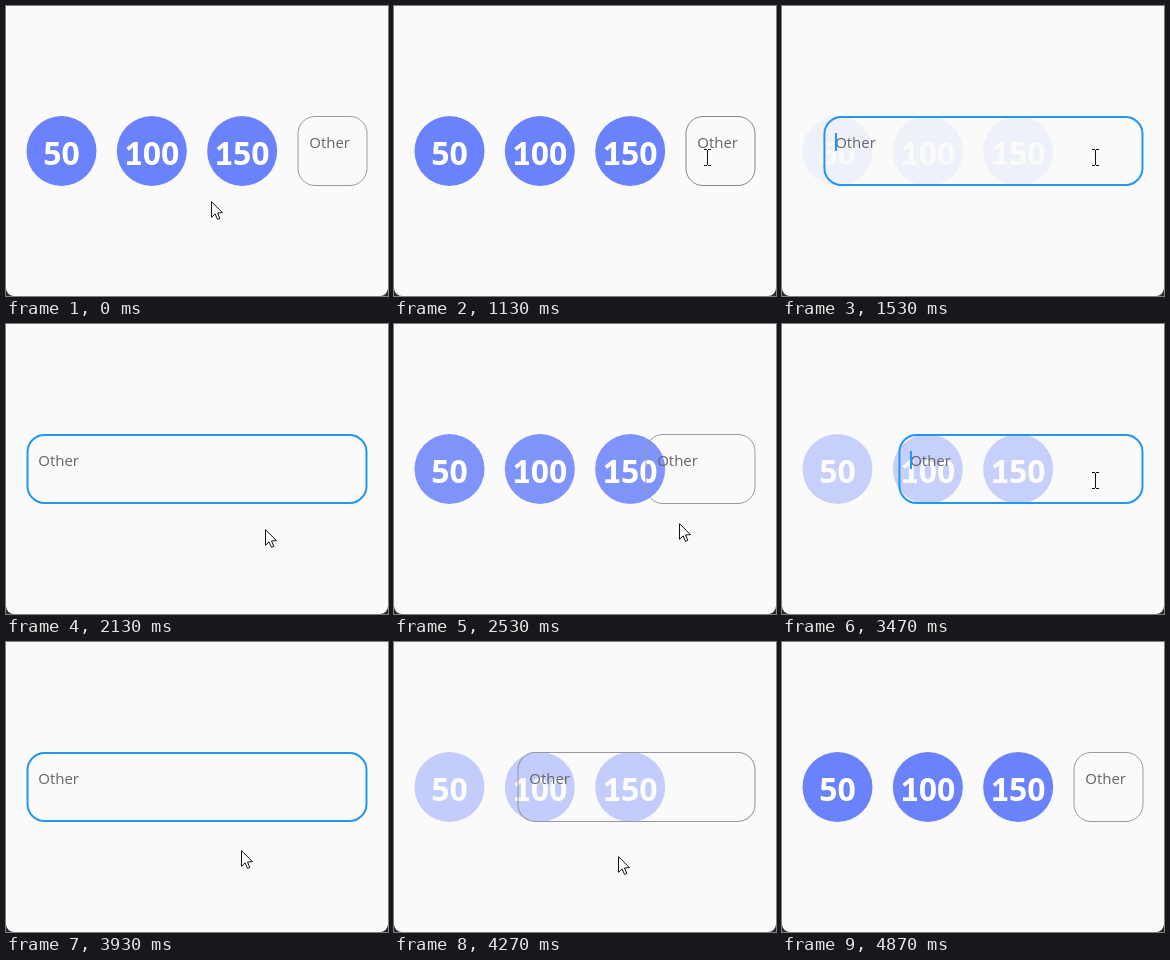
Recreate the animation shown at these times as an HTML page with a canvas. Size 382 by 290 pixels, loop 4990 ms.

```html
<!DOCTYPE html>
<html lang="en">
<head>
<meta charset="utf-8">
<title>Amount picker</title>
<style>
  html, body { margin: 0; width: 100%; height: 100%; overflow: hidden; background: #fafafa; }
  canvas { display: block; }
</style>
</head>
<body>
<canvas id="stage" width="382" height="290"></canvas>
<script>
const ctx = document.getElementById('stage').getContext('2d');
const LOOP = 4990, STEP = 200 / 3;
const MORPH = 420, BORDER = 150, CARET = 480;
const TOP = 110, SIZE = 70, RIGHT = 361.5, OPEN_LEFT = 20.5, CLOSED_LEFT = 291.5;
const PAPER = [250, 250, 250], BLUE = [106, 130, 251], FOCUS = [33, 150, 243];
const visits = [{ open: 1255, close: 2300 }, { open: 3309, close: 4167 }];

// Pointer keys: time, x, y
const path = [
  [435, 205, 195], [930, 309, 157], [1130, 313, 151], [1750, 313, 151],
  [2130, 259, 205], [2300, 259, 205], [2400, 260, 207], [2800, 335, 184],
  [3065, 313, 156], [3500, 313, 156], [3800, 258, 195], [4000, 224, 214],
  [4290, 224, 214], [4600, 215, 292]
];

const clamp = v => Math.min(1, Math.max(0, v));
const lerp = (a, b, k) => a + (b - a) * k;
const mix = (a, b, k) => `rgb(${a.map((v, i) => Math.round(lerp(v, b[i], k)))})`;

// cubic-bezier(.25, .1, .25, 1)
function ease(x) {
  if (x <= 0 || x >= 1) return clamp(x);
  const bezier = (u, a, b) => 3 * u * (1 - u) ** 2 * a + 3 * u * u * (1 - u) * b + u ** 3;
  let lo = 0, hi = 1;
  for (let i = 0; i < 20; i++) {
    const mid = (lo + hi) / 2;
    if (bezier(mid, .25, .25) < x) lo = mid; else hi = mid;
  }
  return bezier(lo, .1, 1);
}

function openness(t, duration) {
  return visits.reduce((sum, v) =>
    sum + ease((t - v.open) / duration) - ease((t - v.close) / duration), 0);
}

function pointerAt(t) {
  const next = path.findIndex(key => key[0] > t);
  if (next === 0) return path[0].slice(1);
  if (next < 0) return path[path.length - 1].slice(1);
  const [t0, x0, y0] = path[next - 1], [t1, x1, y1] = path[next];
  const k = (t - t0) / (t1 - t0);
  return [Math.round(lerp(x0, x1, k)), Math.round(lerp(y0, y1, k))];
}

function drawWindow() {
  ctx.fillStyle = '#2b2b2b';
  ctx.fillRect(0, 0, 382, 290);
  ctx.fillStyle = mix(PAPER, PAPER, 0);
  ctx.beginPath();
  ctx.roundRect(0, 0, 382, 290, [0, 0, 8, 8]);
  ctx.fill();
}

function drawAmounts(alpha) {
  if (alpha <= 0) return;
  ctx.font = 'bold 32px "Open Sans", "Noto Sans", sans-serif';
  ['50', '100', '150'].forEach((label, i) => {
    const x = OPEN_LEFT + SIZE / 2 + i * (CLOSED_LEFT - OPEN_LEFT) / 3;
    ctx.fillStyle = mix(PAPER, BLUE, alpha);
    ctx.beginPath();
    ctx.arc(x, TOP + SIZE / 2, SIZE / 2, 0, Math.PI * 2);
    ctx.fill();
    ctx.fillStyle = mix(PAPER, [255, 255, 255], alpha);
    const left = x - ctx.measureText(label).width / 2;
    ctx.fillText(label, left, 159);
    // Foot of the numeral one
    if (label[0] === '1') ctx.fillRect(left + 2.5, 155.3, 14, 3.7);
  });
}

function drawField(left, focus, hover, caret) {
  const line = 1 + focus, grey = hover ? [133, 133, 133] : [154, 154, 154];
  ctx.strokeStyle = mix(grey, FOCUS, focus);
  ctx.lineWidth = line;
  ctx.beginPath();
  ctx.roundRect(left + line / 2, TOP + line / 2, RIGHT - left - line, SIZE - line, 17);
  ctx.stroke();
  ctx.fillStyle = '#666';
  ctx.font = '15px "Open Sans", "Noto Sans", sans-serif';
  ctx.fillText('Other', left + 11.7, 142);
  if (caret) {
    ctx.fillStyle = mix(FOCUS, FOCUS, 0);
    ctx.fillRect(left + 11.5, 127, 2, 18);
  }
}

function drawArrow(x, y) {
  ctx.beginPath();
  [[.5, .7], [.5, 16.3], [4.1, 12.9], [6.5, 18.4], [8.8, 17.4], [6.5, 12], [11.4, 11.6]]
    .forEach(([dx, dy]) => ctx.lineTo(x + dx, y + dy));
  ctx.closePath();
  ctx.fillStyle = '#fff';
  ctx.fill();
  ctx.strokeStyle = '#111';
  ctx.lineWidth = 1;
  ctx.stroke();
}

function drawBeam(x, y) {
  ctx.fillStyle = '#111';
  ctx.fillRect(x, y - 7, 1, 15);
  for (const end of [y - 8, y + 8]) {
    ctx.fillRect(x - 3, end, 3, 1);
    ctx.fillRect(x + 1, end, 3, 1);
  }
}

function draw(now) {
  const t = Math.floor((now % LOOP + 4) / STEP) * STEP;
  const open = openness(t, MORPH);
  const left = lerp(CLOSED_LEFT, OPEN_LEFT, open);
  const [x, y] = pointerAt(t);
  const inside = x > left && x < RIGHT && y > TOP && y < TOP + SIZE;
  const caret = visits.some(v => t >= v.open && t < v.open + CARET);

  drawWindow();
  drawAmounts(1 - open);
  drawField(left, openness(t, BORDER), inside, caret);
  (inside ? drawBeam : drawArrow)(x, y);
}

const start = performance.now();
function tick() {
  draw(performance.now() - start);
  requestAnimationFrame(tick);
}
tick();
</script>
</body>
</html>
```
